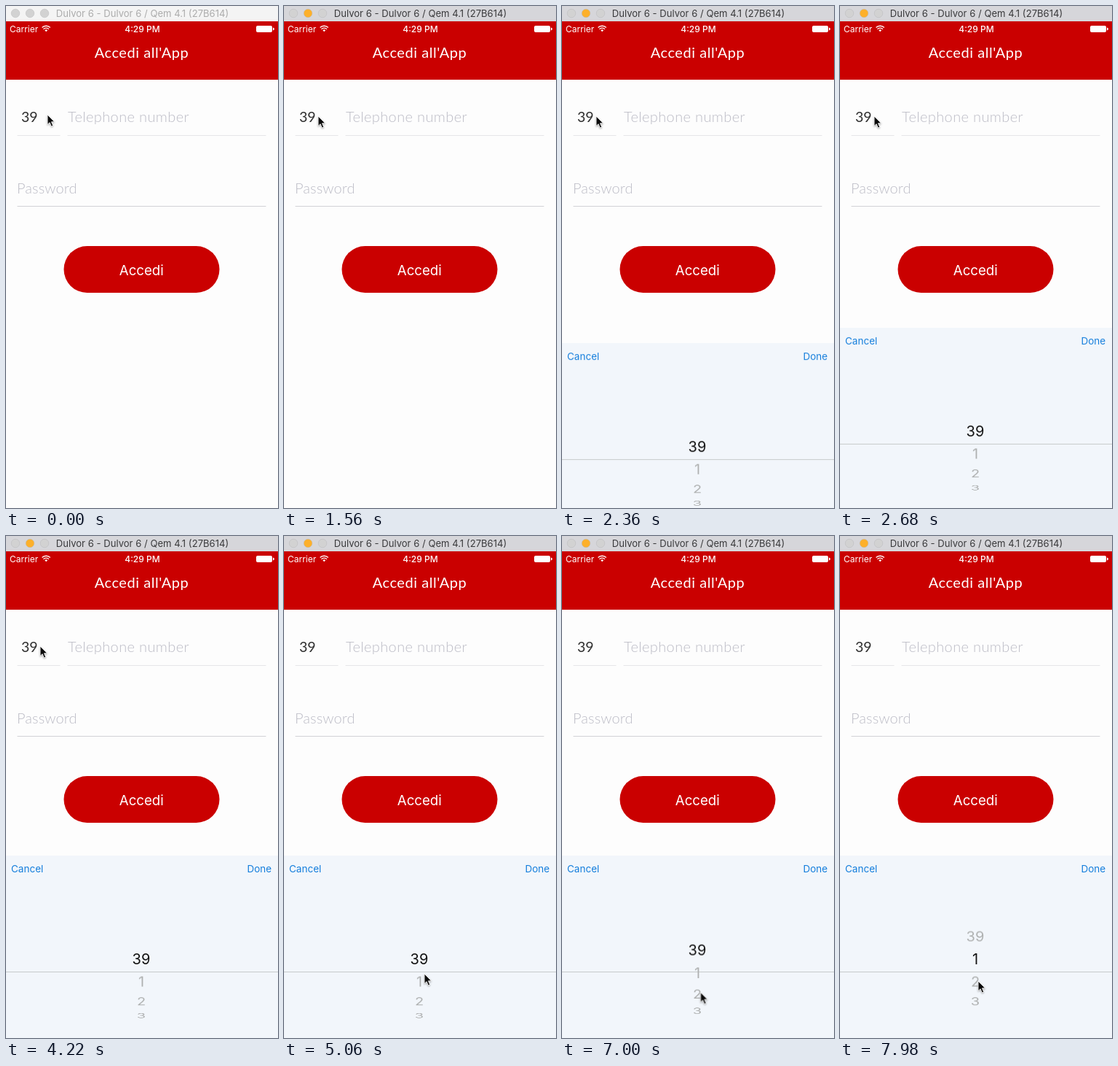
An HTML page that plays this animation: 374x688 px, repeating every 8000 ms.

```html
<!DOCTYPE html>
<html lang="it">
<head>
<meta charset="utf-8">
<title>Accedi</title>
<style>
  :root { --loop: 8s linear infinite; --step: 20.7deg; --radius: 87.7px; --red: #ca0000; --faded: #aeb0b0; --ink: #121212; }
  html, body { margin: 0; width: 100%; height: 100%; overflow: hidden; }
  body { position: relative; background: #fdfdfd; font-family: Inter, "Open Sans", sans-serif; }
  svg { position: absolute; left: 0; top: 0; display: block; }
  .lato { font-family: Lato, "Open Sans", sans-serif; font-size: 20px; }
  .hint { font-weight: 300; fill: #bcbcc6; }
  .mid { text-anchor: middle; }
  .red { fill: var(--red); }

  /* title bar: background window, then focused */
  .bar { animation: bar 8s step-end infinite; }
  .amber { animation: amber 8s step-end infinite; }
  .caption { animation: caption 8s step-end infinite; }
  @keyframes bar { 0% { fill: #f4f4f4; } 12.5%, 100% { fill: #d6d6da; } }
  @keyframes amber { 0% { fill: #d2d2d2; } 12.5%, 100% { fill: #fdb02a; } }
  @keyframes caption { 0% { fill: #acacac; } 12.5%, 100% { fill: #3a3a3c; } }

  .panel {
    position: absolute; left: 0; top: 438px; width: 374px; height: 250px;
    background: #f2f6fb; animation: slide var(--loop);
  }
  @keyframes slide {
    0% { transform: translateY(250px); }
    23.19% {
      transform: translateY(250px);
      animation-timing-function: linear(0, .09, .264, .442, .594, .713, .801, .864, .908, .939, .96, .973, .983, .989, .993, .996, 1);
    }
    36%, 100% { transform: none; }
  }
  .action { position: absolute; top: 8px; font-size: 13.5px; line-height: 20px; color: #147edc; }
  .rule { position: absolute; top: 159px; width: 100%; height: 1px; background: #c6caca; }

  /* orthographic cylinder: no perspective */
  .wheel {
    position: absolute; left: 0; top: 127px; width: 372px; height: 30px;
    transform-style: preserve-3d; animation: spin var(--loop);
  }
  .wheel span {
    position: absolute; inset: 0; text-align: center; font-size: 20px; line-height: 30px; color: var(--faded);
    backface-visibility: hidden;
    transform: rotateX(calc(var(--i) * -1 * var(--step))) translateZ(var(--radius));
  }
  .wheel .before { animation: leave 8s step-end infinite; }
  .wheel .after { animation: enter 8s step-end infinite; }
  @keyframes spin {
    0%, 82.5% { transform: rotateX(0deg); animation-timing-function: ease-in-out; }
    94%, 100% { transform: rotateX(var(--step)); }
  }
  @keyframes leave { 0% { color: var(--ink); } 88.2%, 100% { color: var(--faded); } }
  @keyframes enter { 0% { color: var(--faded); } 88.2%, 100% { color: var(--ink); } }

  .cursor { overflow: visible; filter: drop-shadow(0 1px 1px #0005); animation: point var(--loop); }
  @keyframes point {
    0%, 3.75% { transform: translate(57px, 149px); animation-timing-function: ease-in-out; }
    13.75%, 54.25% { transform: translate(47px, 151px); animation-timing-function: ease-in-out; }
    61%, 77% { transform: translate(193px, 600px); animation-timing-function: ease-in-out; }
    81%, 82.5% { transform: translate(191px, 641px); animation-timing-function: ease-in-out; }
    92.5%, 100% { transform: translate(190px, 610px); }
  }
</style>
</head>
<body>
<svg width="374" height="688">
  <rect class="bar" width="374" height="21"/>
  <g stroke="#b8b8ba" stroke-width=".5" fill="#d2d2d2">
    <circle cx="13" cy="10" r="5.8"/>
    <circle class="amber" cx="33" cy="10" r="5.8"/>
    <circle cx="53" cy="10" r="5.8"/>
  </g>
  <text class="caption mid" x="187.5" y="15" font-size="13.1">Dulvor 6 - Dulvor 6 / Qem 4.1 (27B614)</text>

  <rect class="red" y="21" width="374" height="80"/>
  <g fill="#fff">
    <text x="5" y="35.5" font-size="12">Carrier</text>
    <text class="mid" x="187.5" y="35.5" font-size="12" font-weight="500">4:29 PM</text>
    <text class="lato mid" x="186.5" y="71" letter-spacing=".55">Accedi all'App</text>
    <rect x="344" y="27" width="22" height="9" rx="2"/>
    <path d="M367 29.5q2 .5 2 2t-2 2z"/>
    <path d="M53.3 33.2a2.7 2.7 0 0 1 3.8 0l-1.9 2z"/>
  </g>
  <path d="M49.6 29.6a7.9 7.9 0 0 1 11.2 0M51.5 31.7a5.2 5.2 0 0 1 7.4 0" fill="none" stroke="#fff" stroke-width="1.4"/>

  <text class="lato" x="21" y="159" fill="#303030" style="font-size:19.5px">39</text>
  <text class="lato hint" x="85" y="159" letter-spacing=".37">Telephone number</text>
  <text class="lato hint" x="15" y="257" letter-spacing=".1">Password</text>
  <path d="M15.5 177.5h59M84.5 177.5h273" stroke="#e6e6e8"/>
  <path d="M15.5 274.5h342" stroke="#d2d2d6"/>

  <rect class="red" x="79.5" y="329" width="214" height="64" rx="32"/>
  <text class="mid" x="186.3" y="368.5" font-size="18.7" fill="#fff">Accedi</text>
</svg>

<div class="panel">
  <span class="action" style="left:7px">Cancel</span>
  <span class="action" style="left:331.5px">Done</span>
  <div class="rule"></div>
  <div class="wheel">
    <span class="before" style="--i:0">39</span>
    <span class="after" style="--i:1">1</span>
    <span style="--i:2">2</span>
    <span style="--i:3">3</span>
  </div>
</div>

<svg class="cursor" width="12" height="18">
  <path d="M0 0V13.5L3.1 10.7L5.3 16L7.7 15L5.5 9.8H9.7Z" fill="#0a0a0a" stroke="#fff" stroke-width=".9"/>
</svg>
</body>
</html>
```
